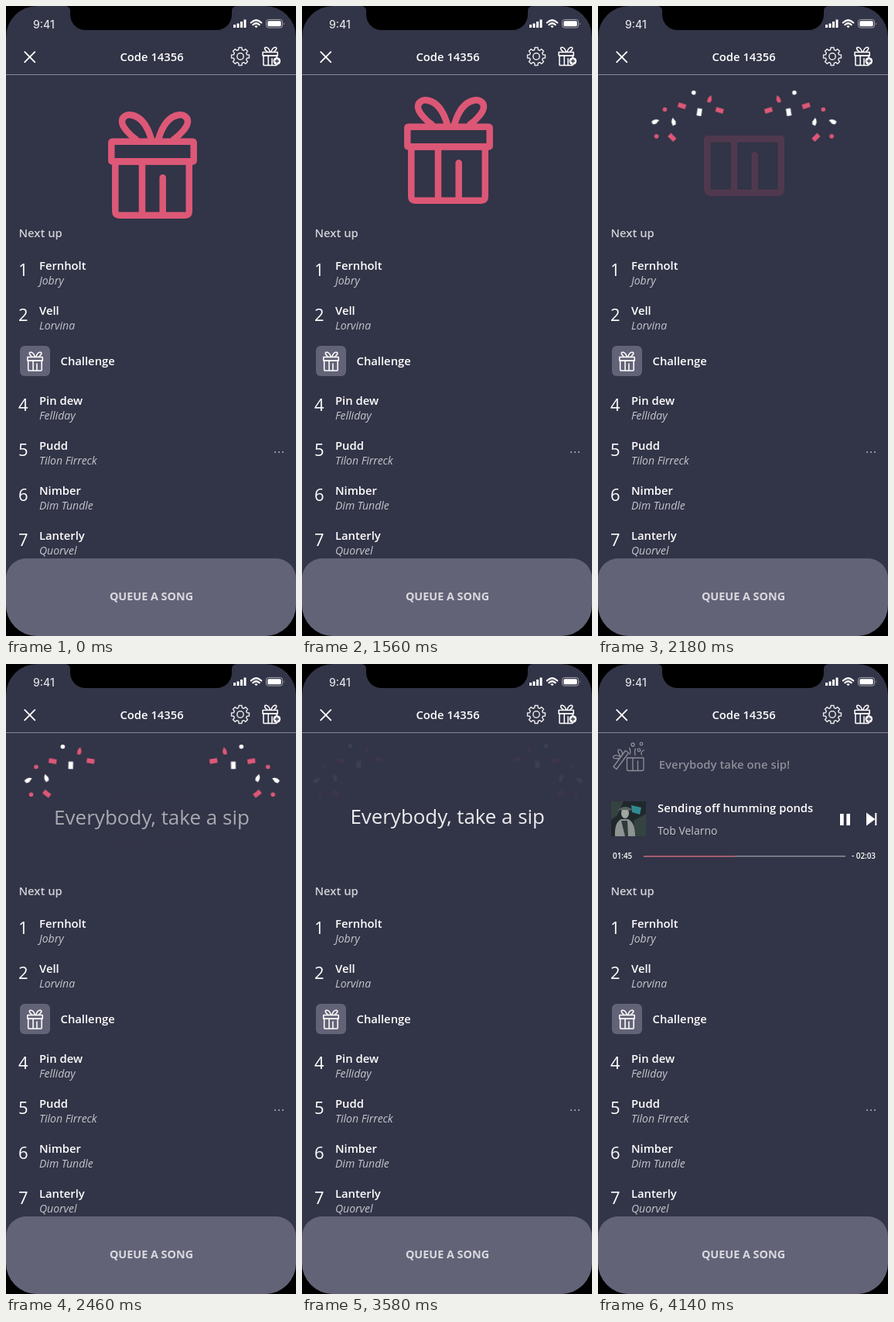
An HTML page that plays this animation: 375 px wide and 812 px high, repeating every 5.56 s.

```html
<!DOCTYPE html>
<html lang="en">
<head>
<meta charset="utf-8">
<title>Party queue</title>
<style>
  html, body { margin: 0; width: 100%; height: 100%; overflow: hidden; background: #000; }
  svg { display: block; width: 375px; height: 812px; font: 600 14.8px "Open Sans", sans-serif; }
  .line { fill: none; stroke-linejoin: round; stroke-linecap: round; }
  .number { font-size: 22px; font-weight: 400; }
  .artist { font-size: 14px; font-weight: 400; font-style: italic; fill: #c6c6ce; }
  .clock { font-size: 9.9px; }
  .center { text-anchor: middle; }
</style>
</head>
<body>
<svg viewBox="0 0 375 812" fill="#fff">
  <defs>
    <g id="lid" class="line" stroke-width="8.5">
      <path d="M168 172C160 166 150 156 150 149C150 142 157 139.500 162 140.500C176 143 184 158 188 172"/>
      <path d="M217 172C225 166 235 156 235 149C235 142 228 139.500 223 140.500C209 143 201 158 197 172"/>
      <rect x="136.300" y="174.800" width="106.400" height="25.600" rx="1"/>
    </g>
    <path id="box" class="line" stroke-width="8.500" stroke-linejoin="miter"
      d="M141.300 200.300H236.800V264.800Q236.800 269.800 231.800 269.800H146.300Q141.300 269.800 141.300 264.800ZM176 200.300V269.800M202.700 221.300V269.800"/>
    <g id="gift"><use href="#lid"/><use href="#box"/></g>
    <path id="flake" d="M-2.500 4.500Q-3.500 -2 1.500 -5L3 1L1.500 4.500Z"/>
    <g id="burst">
      <g fill="#fff">
        <circle cx="62.500" cy="105.500" r="2.800"/>
        <rect x="70.500" y="124.500" width="6" height="9.500"/>
        <use href="#flake" transform="translate(19 149.500) rotate(48)"/>
        <use href="#flake" transform="translate(42 146.500) rotate(-32)"/>
      </g>
      <g fill="#dd5877">
        <circle cx="28.800" cy="132.500" r="2.800"/>
        <circle cx="23.300" cy="168.300" r="2.800"/>
        <use href="#flake" transform="translate(84 110.500)"/>
        <rect x="-5" y="-3" width="10" height="6" transform="translate(50 124.500) rotate(8)"/>
        <rect x="-5" y="-3" width="10" height="6" transform="translate(99 123) rotate(8)"/>
        <rect x="-5" y="-3" width="10" height="6" transform="translate(43.500 166.700) rotate(36)"/>
      </g>
    </g>
    <clipPath id="cover"><rect x="17" y="177" width="45" height="45"/></clipPath>
    <clipPath id="screen"><rect width="375" height="812" rx="40"/></clipPath>
    <clipPath id="stage"><rect y="89" width="375" height="200"/></clipPath>
  </defs>

  <rect width="375" height="812" fill="#000"/>
  <g clip-path="url(#screen)">
    <rect width="375" height="812" fill="#323447"/>

    <!-- status bar -->
    <path d="M77 0A6 6 0 0 1 83 6V11A20 20 0 0 0 103 31H272A20 20 0 0 0 292 11V6A6 6 0 0 1 298 0Z" fill="#000"/>
    <text x="35" y="29.300" style="font:500 14px Inter,sans-serif" fill="#dedee3">9:41</text>
    <path d="M294 24h3v4h-3zM298.500 22.500h3v5.500h-3zM303 20h3v8h-3zM307.500 17.500h3v10.500h-3z"/>
    <g class="line" stroke="#fff" stroke-width="2.200" stroke-linecap="butt">
      <path d="M316.800 21.500Q323.500 15 330.200 21.500M319.300 24.200Q323.500 20.300 327.700 24.200"/>
    </g>
    <path d="M321.300 26Q323.500 24.300 325.700 26L323.500 28.300Z"/>
    <rect x="336.500" y="17.500" width="21" height="10.500" rx="3" fill="none" stroke="#a5a5af"/>
    <rect x="338.300" y="19.300" width="17.400" height="6.900" rx="1.500"/>
    <path d="M359 21v4q1.500-2 0-4z" fill="#a5a5af"/>

    <!-- header -->
    <path class="line" d="M24.200 59.200L37.300 72.300M37.300 59.200L24.200 72.300" stroke="#fff" stroke-width="1.900"/>
    <text class="center" x="188.500" y="71">Code 14356</text>
    <g class="line" stroke="#e4e4e8" stroke-width="1.500">
      <path id="gear"/><circle cx="303" cy="65" r="4.200"/>
    </g>
    <use href="#gift" stroke="#fff" transform="translate(307.500 28) scale(.18)"/>
    <circle cx="350.300" cy="71" r="4.800"/>
    <path d="M350.300 68.300v5.400M347.600 71h5.400" stroke="#323447" stroke-width="1.300"/>
    <rect y="88" width="375" height="1" fill="#85869a"/>

    <!-- surprise -->
    <g clip-path="url(#stage)">
      <use id="bigBox" href="#box" stroke="#dd5877"/>
      <use id="bigLid" href="#lid" stroke="#dd5877"/>
      <g id="confetti">
        <g><use class="burst" href="#burst"/></g>
        <g transform="translate(377.700 0) scale(-1 1)"><use class="burst" href="#burst"/></g>
      </g>
    </g>
    <g transform="translate(188.500 198)" class="center">
      <g id="cheer">
        <text id="cheerBig" y="9" font-size="26" font-weight="400">Everybody, take a sip</text>
        <text id="cheerSmall" y="8.500" font-size="22.800" fill="#8d8e99">Everybody take one sip!</text>
      </g>
    </g>

    <!-- now playing -->
    <g id="player">
      <g class="line" stroke="#8d8e99" stroke-width="1.300">
        <path d="M37.500 121H59V135.500Q59 137.500 57 137.500H39.500Q37.500 137.500 37.500 135.500ZM45 121V137.500M51.500 125V137.500"/>
        <path d="M24 135.500L39.500 114.500L35.500 111.500L20 132.500ZM28 121.500Q17 123 20.500 118.500Q24 116 29.500 120Q23 109 28.500 110.500Q32 112 31.500 117.500"/>
        <path d="M41 116.500Q43 112 40.500 108.500M48 117.500Q47 112 48.500 109M56.500 117Q54.500 113 59.500 111"/>
        <circle cx="45" cy="104" r="2"/><circle cx="56" cy="103" r="1.800"/><circle cx="53" cy="111" r="1.800"/>
      </g>
      <g clip-path="url(#cover)">
        <rect x="17" y="177" width="45" height="45" fill="#20282b"/>
        <path d="M17 177h16l-8 18l-8 6zM46 202l16-9v29h-14z" fill="#34433f"/>
        <path d="M43 182l13 3-2 9-10-3z" fill="#328b91"/>
        <path d="M22 222q-1-18 8-22h9q9 4 9 22z" fill="#8d9493"/>
        <path d="M30 202l5 20h4l-1-20z" fill="#30383a"/>
        <ellipse cx="35" cy="192" rx="5" ry="7" fill="#a1a5a2"/>
        <path d="M25 189q9-9 19-2l-2 2q-8-2-17 0z" fill="#59625f"/>
      </g>
      <text x="77" y="191">Sending off humming ponds</text>
      <text x="77" y="220" font-size="14" font-weight="400" fill="#c6c6ce">Tob Velarno</text>
      <path d="M313 193h4.700v15h-4.700zM321.300 193h4.700v15h-4.700z"/>
      <path d="M347 191.500L358.500 200L347 208.500ZM358.300 192h2v16h-2z"/>
      <text class="clock" x="19" y="251">01:45</text>
      <text class="clock" x="328" y="251">- 02:03</text>
      <rect x="59" y="247" width="261" height="1.500" fill="#8d8e99"/>
      <rect x="59" y="247" width="118" height="1.500" fill="#bd5c72"/>
    </g>

    <!-- queue -->
    <text x="16.500" y="298" fill="#d0d0d6">Next up</text>
    <g id="queue"></g>
    <rect x="18" y="438" width="39" height="39" rx="6" fill="#636378"/>
    <use href="#gift" stroke="#fff" transform="translate(2.840 420.600) scale(.183)"/>
    <text x="70.500" y="463">Challenge</text>
    <g fill="#b0b0ba">
      <circle cx="348" cy="575" r="1"/><circle cx="353" cy="575" r="1"/><circle cx="358" cy="575" r="1"/>
    </g>

    <path d="M0 812V738A26 26 0 0 1 26 712H349A26 26 0 0 1 375 738V812Z" fill="#636378"/>
    <text class="center" x="188" y="766" font-size="14.400" font-weight="700" fill="#d9d9df">QUEUE A SONG</text>
  </g>
</svg>

<script>
const LOOP = 5560;
const byId = id => document.getElementById(id);

const songs = [
  [1, 'Fernholt', 'Jobry'], [2, 'Vell', 'Lorvina'], [4, 'Pin dew', 'Felliday'],
  [5, 'Pudd', 'Tilon Firreck'], [6, 'Nimber', 'Dim Tundle'], [7, 'Lanterly', 'Quorvel']
];
byId('queue').innerHTML = songs.map(([n, title, artist]) => {
  const y = 340 + (n - 1) * 58;
  return `<text class="number" x="16" y="${y + 8}">${n}</text>
    <text x="43" y="${y}">${title}</text>
    <text class="artist" x="43" y="${y + 19}">${artist}</text>`;
}).join('');

const gearPoints = [];
for (let tooth = 0; tooth < 8; tooth++) {
  for (const [turn, r] of [[-.27, 8.8], [-.17, 11.6], [.17, 11.6], [.27, 8.8]]) {
    const a = tooth * Math.PI / 4 + turn;
    gearPoints.push(`${(303 + r * Math.cos(a)).toFixed(2)} ${(65 + r * Math.sin(a)).toFixed(2)}`);
  }
}
byId('gear').setAttribute('d', `M${gearPoints.join('L')}Z`);

const animations = [];

// Each step is [ms, value, easing towards the next step].
function play(element, property, steps) {
  const all = [[0, steps[0][1]], ...steps, [LOOP, steps[steps.length - 1][1]]];
  const frames = all.map(([ms, value, easing = 'linear']) =>
    ({ offset: ms / LOOP, [property]: value, easing }));
  animations.push(element.animate(frames, { duration: LOOP, iterations: Infinity }));
}
const fade = (id, ...steps) => play(byId(id), 'opacity', steps);
const rise = (id, ...steps) => play(byId(id), 'transform',
  steps.map(([ms, y, easing]) => [ms, `translate(0px, ${y}px)`, easing]));

const SMOOTH = 'ease-in-out';
const CUBIC_OUT = 'cubic-bezier(.333, 1, .667, 1)';

rise('bigBox', [460, 0, SMOOTH], [860, 4, SMOOTH], [1560, -19], [2180, -29, 'ease-out'], [2560, -33]);
rise('bigLid', [980, 0, SMOOTH], [1560, -19, 'ease-in'], [2140, -56]);
fade('bigBox', [1560, 1], [2180, .18], [2480, 0]);
fade('bigLid', [1560, 1], [2140, 0]);

for (const burst of document.querySelectorAll('.burst')) {
  burst.style.transformOrigin = '59px 137px';
  play(burst, 'transform', [
    [1960, 'translate(138px, 13px) rotate(21deg)', CUBIC_OUT],
    [2820, 'translate(0px, 0px) rotate(0deg)']
  ]);
}
fade('confetti', [1960, 0], [2100, 1], [3260, 1], [3600, 0]);

play(byId('cheer'), 'transform', [
  [3530, 'translate(0px, 0px) scale(1)', SMOOTH],
  [4140, 'translate(-25px, -69px) scale(.652)']
]);
fade('cheerBig', [2190, 0], [2660, 1], [3550, 1], [3900, 0]);
fade('cheerSmall', [3620, 0], [4140, 1]);
fade('player', [3570, 0, SMOOTH], [4140, 1]);

const start = document.timeline.currentTime ?? 0;
for (const animation of animations) animation.startTime = start;
</script>
</body>
</html>
```
